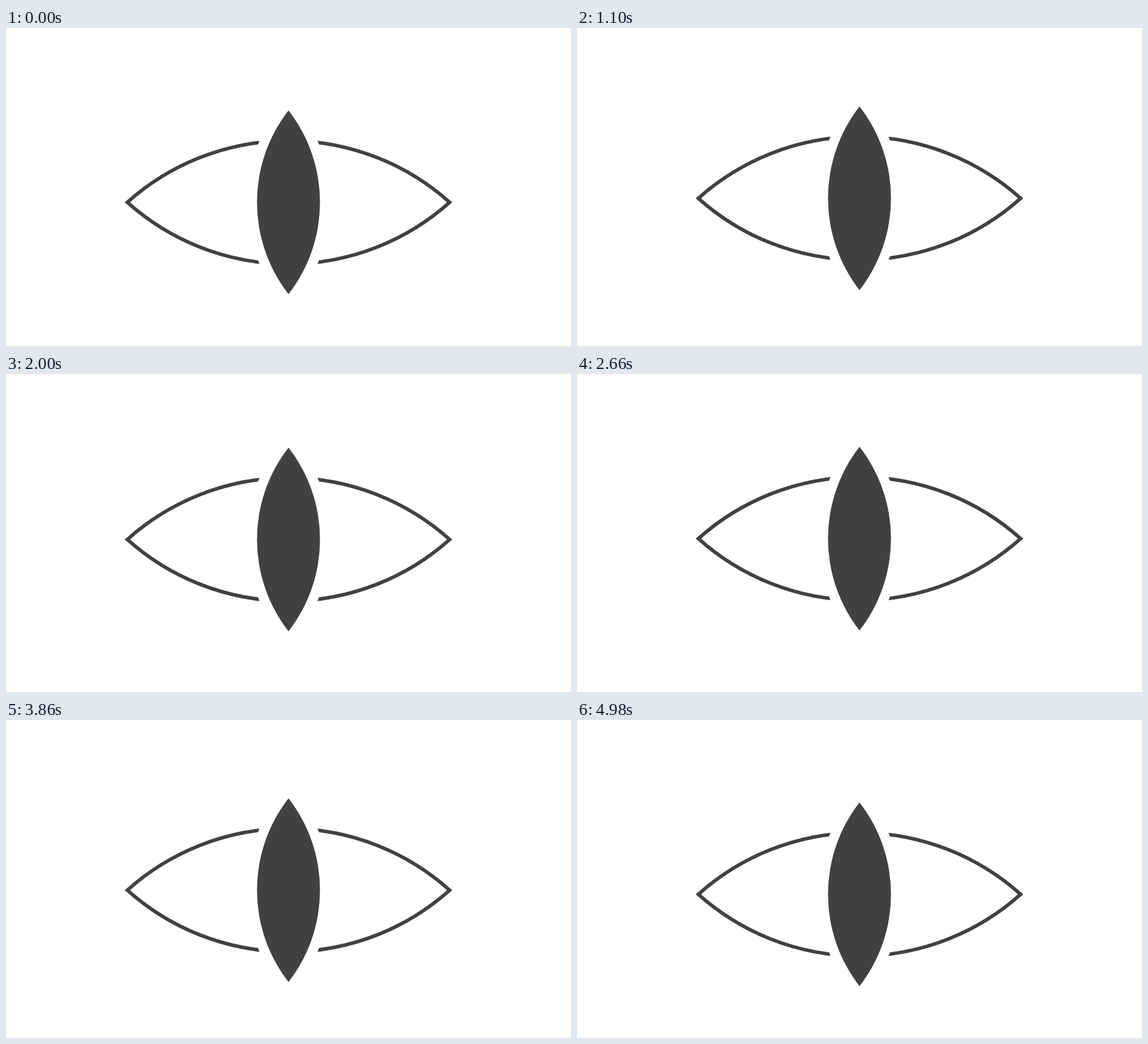
Recreate the animation shown at these times as an HTML page with a canvas. Size 960 px wide and 540 px high, loop 5020 ms.

```html
<!DOCTYPE html>
<html lang="en">
<head>
<meta charset="utf-8">
<title>Blinking eye</title>
<style>
  html, body { margin: 0; width: 100%; height: 100%; overflow: hidden; background: #fff; }
  canvas { display: block; }
</style>
</head>
<body>
<canvas id="stage" width="960" height="540"></canvas>
<script>
const ctx = document.getElementById('stage').getContext('2d');
const INK = '#424042';
const LOOP = 5020, CYCLE = 5000, SHIFT = 10;
const BLINK_START = 500, BLINK_LENGTH = 500;

// Lens of two circular arcs, pointed at (-half, 0) and (half, 0).
function lens(half, height) {
  const r = (half * half + height * height) / (2 * height);
  const a = Math.asin(half / r);
  const up = -Math.PI / 2, down = Math.PI / 2;
  const path = new Path2D();
  path.arc(0, r - height, r, up - a, up + a);
  path.arc(0, height - r, r, down - a, down + a);
  path.closePath();
  return path;
}

const lids = lens(273.8, 104.6);
const pupil = lens(156, 53.5);

function floatY(t) {
  return 287.7 + 8.3 * Math.cos(2 * Math.PI * t / CYCLE);
}

function openness(t) {
  const p = (t - BLINK_START) / BLINK_LENGTH;
  if (p <= 0 || p >= 1) return 1;
  return (1 + Math.cos(2 * Math.PI * p)) / 2;
}

function draw(ms) {
  const t = ms % LOOP + SHIFT;
  ctx.setTransform(1, 0, 0, 1, 0, 0);
  ctx.fillStyle = '#fff';
  ctx.fillRect(0, 0, 960, 540);

  const open = openness(t);
  if (open < 0.001) return;
  ctx.translate(480, floatY(t));
  ctx.scale(1, open);
  ctx.lineJoin = 'miter';

  ctx.strokeStyle = INK;
  ctx.lineWidth = 6;
  ctx.stroke(lids);

  ctx.rotate(Math.PI / 2);
  ctx.strokeStyle = '#fff';
  ctx.lineWidth = 34;
  ctx.stroke(pupil);
  ctx.fillStyle = INK;
  ctx.fill(pupil);
}

const start = performance.now();
function tick() {
  draw(performance.now() - start);
  requestAnimationFrame(tick);
}
tick();
</script>
</body>
</html>
```
